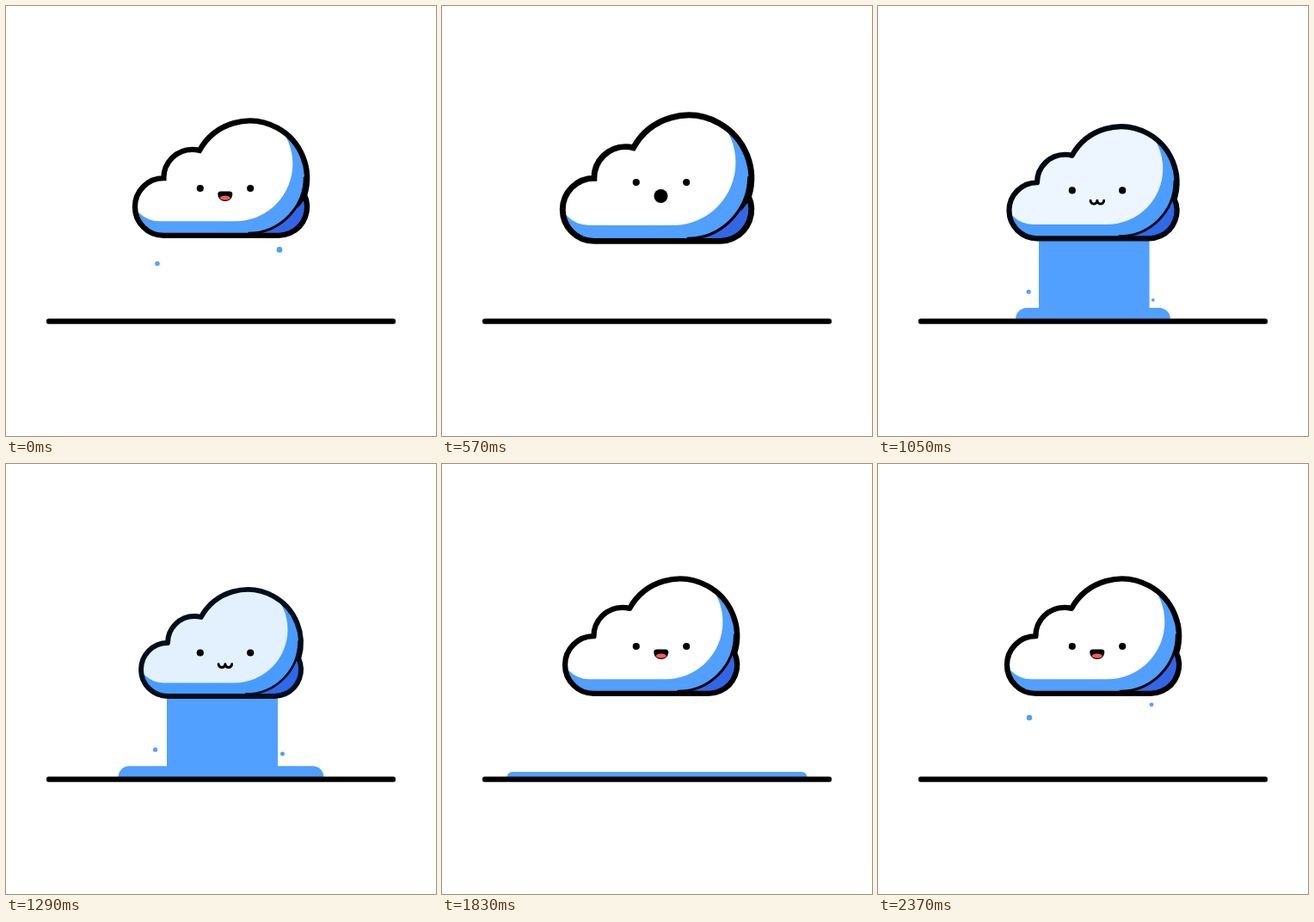
An HTML page with a canvas that plays this animation: 500x500 px, repeating every 2.4 s.

```html
<!DOCTYPE html>
<html lang="en">
<head>
<meta charset="utf-8">
<title>Rain cloud</title>
<style>
  html, body { margin: 0; width: 100%; height: 100%; overflow: hidden; background: #fff; }
  canvas { display: block; }
</style>
</head>
<body>
<canvas id="stage" width="500" height="500"></canvas>
<script>
const ctx = document.getElementById('stage').getContext('2d');
const LOOP = 2400, PI = Math.PI, BLUE = '#519fff';

const linear = (t, from, to) => Math.min(1, Math.max(0, (t - from) / (to - from)));
const ramp = (t, from, to) => {
  const p = linear(t, from, to);
  return p * p * (3 - 2 * p);
};

// The cloud swells, sinks while raining, then recovers and wiggles.
function pose(t) {
  const swell = ramp(t, 120, 590), sink = ramp(t, 690, 1290), recover = ramp(t, 1290, 1560);
  return {
    unit: 33.35 + 3.25 * swell - 5.6 * ramp(t, 590, 1290) + 2.35 * ramp(t, 1290, 1800),
    x: 250 - 8 * Math.sin(2 * PI * linear(t, 1620, 2250)),
    y: 200.2 + 7.8 * (sink - recover),
    tint: .11 * (sink - recover),
    eyeY: 212 - 7 * swell + 14.5 * sink - 7.5 * recover,
    eyeOpen: 1 - ramp(t, 1490, 1545) + ramp(t, 1575, 1630),
    mouthY: 214.4 + 18.2 * sink - 10 * recover
  };
}

function dot(x, y, r, color, squash = 1) {
  ctx.fillStyle = color;
  ctx.beginPath();
  ctx.ellipse(x, y, r, r * squash, 0, 0, 2 * PI);
  ctx.fill();
}

function fillRound(x, y, w, h, radii, color) {
  ctx.fillStyle = color;
  ctx.beginPath();
  ctx.roundRect(x, y, w, h, radii);
  ctx.fill();
}

function drawColumn(t, x, fullWidth, start) {
  const w = fullWidth * (ramp(t, start, start + 400) - ramp(t, 1330, 1500));
  ctx.fillStyle = BLUE;
  ctx.fillRect(x - w / 2, 262, w, 102 * linear(t, start, start + 110));
}

function drawPuddle(t) {
  const half = 52 + 145 * Math.sin(PI / 2 * linear(t, 710, LOOP)) ** 1.15;
  const h = 13 * (ramp(t, 650, 1050) - ramp(t, 1200, LOOP));
  if (h > .4) fillRound(250 - half, 364 - h, 2 * half, h, [h, h, 0, 0], BLUE);
}

// Drops come in left and right pairs; each grows and shrinks over its life.
function drawDrops(t, pairs, first, gap, delay, life, radius, place) {
  for (let pair = 0; pair < pairs; pair++) {
    for (const right of [0, 1]) {
      const start = first + gap * pair + delay * right;
      const p = ((t - start + LOOP) % LOOP) / life;
      if (p < 1) dot(...place(p, pair, right), (radius + .6 * right) * Math.sin(PI * p), BLUE);
    }
  }
}

const drip = (p, pair, right) => right
  ? [334.5 - 16.5 * pair, 273 + 34 * p]
  : [184.5 - 8.5 * pair, 270 + 41 * p];

const splash = (p, pair, right) => [
  250 + (right ? 1 : -1) * (68 - 9 * (pair - 1.5) ** 2 + 20 * p),
  360 - 28 * 4 * p * (1 - p)
];

function drawWater(t) {
  drawColumn(t, 216, 58, 624);
  drawColumn(t, 251, 90, 643);
  drawColumn(t, 300, 32, 690);
  drawPuddle(t);
  drawDrops(t, 2, 1850, 350, 115, 280, 3.5, drip);
  drawDrops(t, 4, 700, 215, 75, 300, 2.6, splash);
}

// The cloud lives on a 6 x 4 grid.
function outline() {
  ctx.beginPath();
  ctx.arc(1, 3, 1, PI / 2, 1.5 * PI);
  ctx.arc(2, 2, 1, PI, Math.atan2(-.968, .25));
  ctx.arc(4, 2, 2, Math.atan2(-.968, -1.75), Math.atan2(.589, 1.911));
  ctx.arc(5, 3, 1, Math.atan2(-.411, .911), PI / 2);
  ctx.closePath();
}

function drawCloud({ unit, x, y, tint }) {
  const tinted = (...rgb) => `rgb(${rgb.map((c, i) => Math.round(c + (127.5 * i - c) * tint))})`;
  const light = tinted(81, 159, 255);
  ctx.save();
  ctx.translate(x - 3 * unit, y - 2 * unit);
  ctx.scale(unit, unit);
  ctx.strokeStyle = tinted(0, 0, 0);

  ctx.save();
  outline();
  ctx.clip();
  ctx.fillStyle = light;
  ctx.fillRect(0, 0, 6, 4);
  ctx.fillStyle = tinted(51, 102, 230);
  ctx.fillRect(4, 2.4, 2, 2);
  dot(3.95, 1.95, 1.97, light);
  ctx.lineWidth = .09;
  ctx.beginPath();
  ctx.arc(3.95, 1.95, 1.97, 0, PI / 2);
  ctx.stroke();
  ctx.fillStyle = tinted(255, 255, 255);
  ctx.beginPath();
  ctx.arc(.85, 2.5, 1, PI / 2, PI);
  ctx.lineTo(-.5, -.5);
  ctx.arc(3.5, 1.5, 2, -PI / 2, PI / 2);
  ctx.fill();
  ctx.restore();

  outline();
  ctx.lineWidth = .19;
  ctx.stroke();
  ctx.restore();
}

function drawSmile() {
  ctx.save();
  ctx.beginPath();
  ctx.moveTo(250, 215.5);
  ctx.lineTo(259.6, 215.5);
  ctx.quadraticCurveTo(263.3, 215.5, 263.3, 218.5);
  ctx.bezierCurveTo(263.3, 229.8, 246.3, 229.8, 246.3, 218.5);
  ctx.quadraticCurveTo(246.3, 215.5, 250, 215.5);
  ctx.fillStyle = '#000';
  ctx.fill();
  ctx.clip();
  dot(254.8, 223.2, 5.8, '#ff5a5a', .45);
  ctx.restore();
}

function drawRipple(y) {
  ctx.strokeStyle = '#000';
  ctx.lineWidth = 2.9;
  ctx.lineCap = ctx.lineJoin = 'round';
  ctx.beginPath();
  ctx.arc(251, y, 3.9, PI, 0, true);
  ctx.arc(258.8, y, 3.9, PI, 0, true);
  ctx.stroke();
}

function drawFace(t, { eyeY, eyeOpen, mouthY }) {
  for (const x of [225.8, 284.2]) dot(x, eyeY, 4.1, '#000', Math.max(0, eyeOpen));
  if (t < 150 || t >= 1450) drawSmile();
  else if (t < 600) dot(254.5, 221, 4 + 4 * ramp(t, 150, 330), '#000');
  else drawRipple(mouthY);
}

function draw(t) {
  const now = pose(t);
  ctx.fillStyle = '#fff';
  ctx.fillRect(0, 0, 500, 500);
  drawWater(t);
  drawCloud(now);
  drawFace(t, now);
  fillRound(47, 363.4, 406, 6.4, 2.5, '#000');
}

const begin = performance.now();
function tick() {
  draw((performance.now() - begin) % LOOP);
  requestAnimationFrame(tick);
}
tick();
</script>
</body>
</html>
```
